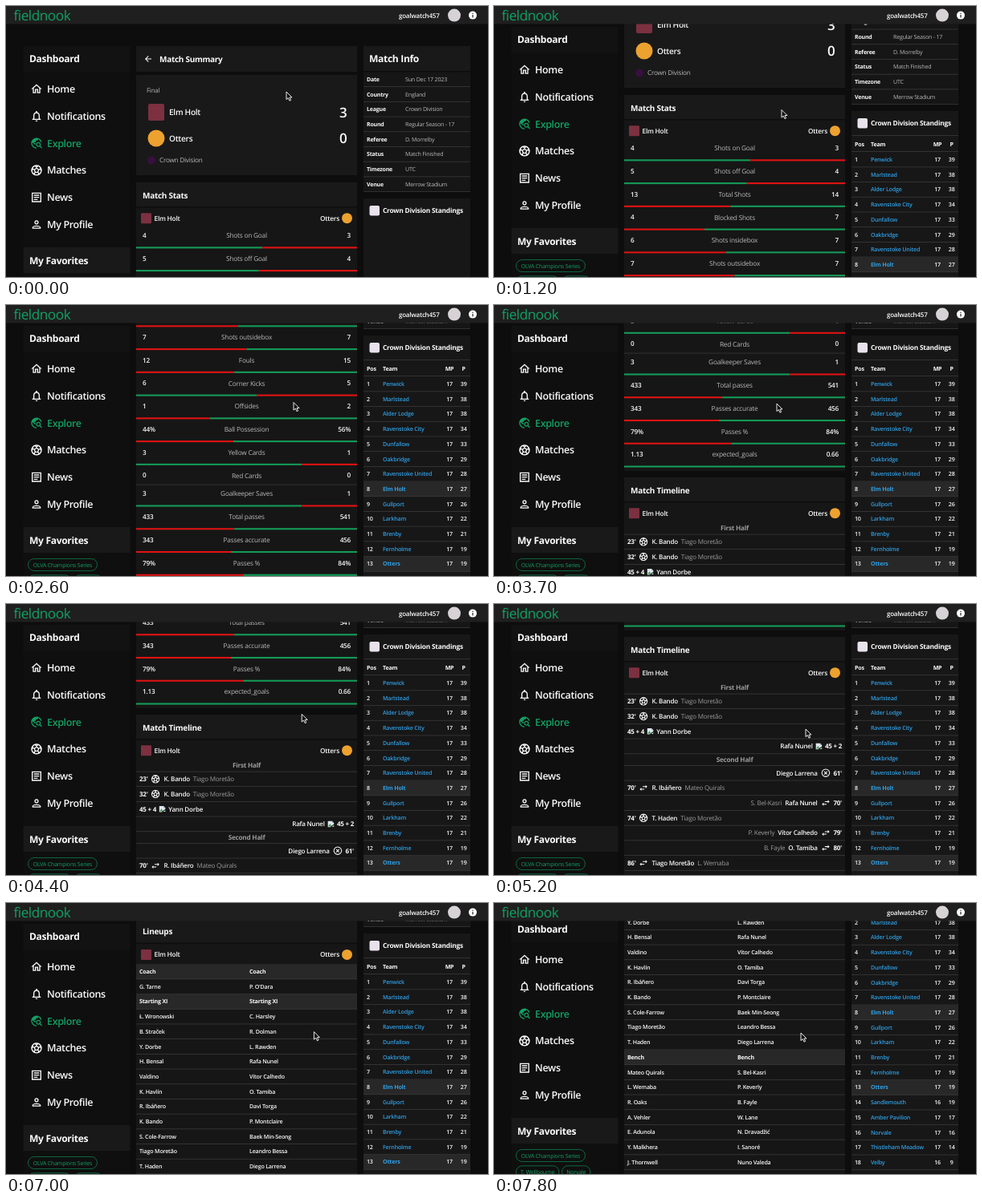
Animation, 600 px wide and 338 px high, one loop 7.9 s. Source, as an HTML page:

```html
<!DOCTYPE html>
<html lang="en">
<head>
<meta charset="utf-8">
<title>Match summary</title>
<style>
  html, body { margin: 0; width: 100%; height: 100%; overflow: hidden; background: #0d0d0d; }
  svg { display: block; }
  text {
    font-family: "Open Sans", "Noto Sans", sans-serif; fill: #fafafa; white-space: pre;
    letter-spacing: -.028em; text-rendering: geometricPrecision;
  }
  .b { font-weight: 700; }
  .m { font-weight: 600; }
  .grey { fill: #b8b8b8; }
  .dim { fill: #9a9a9a; }
  .green { fill: #12a063; }
  .link { fill: #2f9fe4; }
</style>
</head>
<body>
<svg id="stage" width="600" height="338" viewBox="0 0 600 338">
  <g id="main"></g>
  <g id="left"></g>
  <g id="right"></g>
  <g id="bar"></g>
  <path id="cursor" d="M0 0V9.6L2.3 7.6L4 11.2L5.6 10.4L4 7H7Z" fill="#111" stroke="#fff" stroke-width=".9" stroke-linejoin="round"/>
</svg>
<script>
const LOOP = 7900, STEP = 100, PITCH = 18.7;
const $ = id => document.getElementById(id);
const ruler = document.createElement('canvas').getContext('2d');

const HOME = 'Elm Holt', AWAY = 'Otters', LEAGUE = 'Crown Division';
const HOME_COLOR = '#7c3040', AWAY_COLOR = '#eda12f';

// Drawing helpers; text is centred vertically on y.
const text = (x, y, size, str, cls = '', anchor = 'start') =>
  `<text x="${x}" y="${(y + size * .357).toFixed(2)}" font-size="${size}" class="${cls}" text-anchor="${anchor}">${str}</text>`;
const rect = (x, y, w, h, fill, rx = 0) =>
  `<rect x="${x}" y="${y}" width="${w}" height="${h}" fill="${fill}" rx="${rx}"/>`;
const dot = (x, y, r, fill) => `<circle cx="${x}" cy="${y}" r="${r}" fill="${fill}"/>`;
const rule = (x, y, w) => rect(x, y - .35, w, .7, '#3e3e3e');
const icon = (name, x, y, size, color = '#fafafa') =>
  `<g transform="translate(${x - size / 2} ${y - size / 2}) scale(${size / 24})" fill="${color}" color="${color}">${ICONS[name]}</g>`;
const widthOf = (str, weight, size) => {
  ruler.font = `${weight} ${size}px "Open Sans", "Noto Sans", sans-serif`;
  return ruler.measureText(str).width - .028 * size * str.length;
};
const solid = d => `<path d="${d}"/>`;
const line = d => `<path d="${d}" fill="none" stroke="currentColor" stroke-width="2"/>`;

const ICONS = {
  home: solid('M12 5.69l5 4.5V18h-2v-6H9v6H7v-7.81l5-4.5M12 3L2 12h3v8h6v-6h2v6h6v-8h3L12 3z'),
  bell: solid('M12 22c1.1 0 2-.9 2-2h-4c0 1.1.89 2 2 2zm6-6v-5c0-3.07-1.64-5.64-4.5-6.32V4c0-.83-.67-1.5-1.5-1.5s-1.5.67-1.5 1.5v.68C7.63 5.36 6 7.92 6 11v5l-2 2v1h16v-1l-2-2zm-2 1H8v-6c0-2.48 1.51-4.5 4-4.5s4 2.02 4 4.5v6z'),
  globe: solid('M19.3 16.9c.4-.7.7-1.5.7-2.4 0-2.5-2-4.5-4.5-4.5S11 12 11 14.5s2 4.5 4.5 4.5c.9 0 1.7-.3 2.4-.7l3.2 3.2 1.4-1.4-3.2-3.2zm-3.8.1c-1.4 0-2.5-1.1-2.5-2.5s1.1-2.5 2.5-2.5 2.5 1.1 2.5 2.5-1.1 2.5-2.5 2.5zM12 20v2C6.48 22 2 17.52 2 12S6.48 2 12 2c4.84 0 8.87 3.44 9.8 8h-2.07c-.64-2.46-2.4-4.47-4.73-5.41V5c0 1.1-.9 2-2 2h-2v2c0 .55-.45 1-1 1H8v2h2v3H9l-4.79-4.79C4.08 10.79 4 11.38 4 12c0 4.41 3.59 8 8 8z'),
  ball: line('M12 3a9 9 0 1 0 .01 0zM12 8l4 3-1.5 4.6h-5L8 11zM12 8V5.5L9 4M12 5.5L15 4M16 11l2.5-1 1.5-3M18.5 10L21 12M14.5 15.6l1.6 2.4-1 2.5M9.5 15.6L7.9 18l1 2.5M8 11l-2.5-1L4 7M5.5 10L3 12'),
  news: line('M4 4H20V20H4ZM7 8H17M7 12H17M7 16H14'),
  person: line('M12 5a3 3 0 1 0 .01 0zM5 19v-1c0-2 4.5-3.1 7-3.1s7 1.1 7 3.1v1z'),
  swap: solid('M6.99 11L3 15l3.99 4v-3H14v-2H6.99v-3zM21 9l-3.99-4v3H10v2h7.01v3L21 9z'),
  cancel: line('M12 3a9 9 0 1 0 .01 0zM8.5 8.5l7 7M15.5 8.5l-7 7'),
  back: solid('M20 11H7.83l5.59-5.59L12 4l-8 8 8 8 1.41-1.41L7.83 13H20v-2z'),
  broken: '<path d="M2 2H16L22 8V13L13 18L10 22H2Z" fill="#dfe6ee"/><path d="M16 2V8H22Z" fill="#9aa4ae"/><path d="M4 18L9 11L13 16L10 20H4Z" fill="#3fa14a"/><path d="M14 21L22 16V21Z" fill="#dfe6ee"/>'
};

// A panel has a header strip, a dark gap and a body.
const panel = (x, y, w, h, head) =>
  rect(x, y, w, h, '#161616') + rect(x, y, w, head, '#191919') + rect(x, y + head, w, 1.5, '#0d0d0d');

const crests = y =>
  rect(168, y - 6.5, 13, 13, HOME_COLOR, 1) + text(184.5, y, 8.3, HOME, 'm') +
  text(415, y, 8.3, AWAY, 'm', 'end') + dot(424.5, y, 6.5, AWAY_COLOR);

const section = (top, height, title) =>
  panel(162, top, 275, height, 30) + text(170, top + 16, 10, title, 'b') + crests(top + 44.7);

function scoreCard() {
  const team = (y, name, score) => text(203, y, 10.1, name, 'm') + text(419.5, y, 17, score, 'm', 'middle');
  return rect(162, 50, 275, 32, '#191919') + icon('back', 177, 66, 12) + text(191, 66, 10, 'Match Summary', 'b') +
    rect(162, 86, 275, 125, '#191919') + text(175, 105.5, 7.9, 'Final', 'grey') +
    rect(177, 122, 20, 21, HOME_COLOR, 2) + team(132.5, HOME, 3) +
    dot(187, 165, 10.5, AWAY_COLOR) + team(165, AWAY, 0) +
    dot(181, 192.5, 5, '#37103f') + text(191, 192.5, 8.2, LEAGUE, 'grey');
}

const STATS = [
  ['Shots on Goal', 4, 3], ['Shots off Goal', 5, 4], ['Total Shots', 13, 14], ['Blocked Shots', 4, 7],
  ['Shots insidebox', 6, 7], ['Shots outsidebox', 7, 7], ['Fouls', 12, 15], ['Corner Kicks', 6, 5],
  ['Offsides', 1, 2], ['Ball Possession', '44%', '56%'], ['Yellow Cards', 3, 1], ['Red Cards', 0, 0],
  ['Goalkeeper Saves', 3, 1], ['Total passes', 433, 541], ['Passes accurate', 343, 456],
  ['Passes %', '79%', '84%'], ['expected_goals', 1.13, '0.66']
];

function stats() {
  let y = 286.3, out = section(220, 541, 'Match Stats');
  for (const [label, home, away] of STATS) {
    const a = parseInt(home), b = parseInt(away), sum = a + b;
    out += text(170, y, 8.2, home, 'm') + text(299.5, y, 8.3, label, 'grey', 'middle') + text(429, y, 8.2, away, 'm', 'end');
    if (sum) {
      const w = 275 * a / sum, win = a > b;
      out += rect(162, y + 14, w, 2.1, win ? '#149a58' : '#e01212') +
        rect(162 + w, y + 14, 275 - w, 2.1, win ? '#e01212' : '#149a58');
    } else out += rule(162, y + 11.5, 275);
    y += sum ? 28.75 : 22.9;
  }
  return out;
}

// side, time, icon, player, second player
const FIRST_HALF = [
  ['L', "23'", 'ball', 'K. Bando', 'Tiago Moretão'],
  ['L', "32'", 'ball', 'K. Bando', 'Tiago Moretão'],
  ['L', '45 + 4', 'broken', 'Yann Dorbe'],
  ['R', '45 + 2', 'broken', 'Rafa Nunel']
];
const SECOND_HALF = [
  ['R', "61'", 'cancel', 'Diego Larrena'],
  ['L', "70'", 'swap', 'R. Ibáñero', 'Mateo Quirals'],
  ['R', "70'", 'swap', 'Rafa Nunel', 'S. Bel-Kasri'],
  ['L', "74'", 'ball', 'T. Haden', 'Tiago Moretão'],
  ['R', "79'", 'swap', 'Vítor Calhedo', 'P. Keverly'],
  ['R', "80'", 'swap', 'O. Tamiba', 'B. Fayle'],
  ['L', "86'", 'swap', 'Tiago Moretão', 'L. Wemaba'],
  ['L', "86'", 'swap', 'K. Bando', 'R. Oaks'],
  ['L', "87'", 'broken', 'Bohumil Straček'],
  ['L', '90 + 3', 'broken', 'Armin Vehler'],
  ['L', '90 + 1', 'swap', 'B. Straček', 'A. Vehler']
];

function event([side, time, kind, who, other = ''], y) {
  const size = 8, dir = side === 'L' ? 1 : -1, anchor = dir > 0 ? 'start' : 'end';
  const small = kind === 'broken', start = dir > 0 ? 166 : 433;
  const mid = start + dir * (widthOf(time, 700, size) + (small ? 7.5 : 9.5));
  const nameX = mid + dir * (small ? 7.7 : 10.3);
  const otherX = nameX + dir * (widthOf(who, 600, size) + 4);
  return text(start, y, size, time, 'b', anchor) + icon(kind, mid, y, small ? 9 : 12.5) +
    text(nameX, y, size, who, 'm', anchor) + text(otherX, y, size, other, 'dim', anchor) +
    rule(162, y + PITCH / 2, 275);
}

function timeline() {
  const half = (y, label) => text(299.5, y, 8.2, label, 'b dim', 'middle') + rule(162, y + 7.6, 275);
  return section(769, 366, 'Match Timeline') +
    half(832.5, 'First Half') + FIRST_HALF.map((e, i) => event(e, 849.3 + i * PITCH)).join('') +
    half(922, 'Second Half') + SECOND_HALF.map((e, i) => event(e, 938.7 + i * PITCH)).join('');
}

const LINEUPS = `Coach|Coach
G. Tarne|P. O'Dara
Starting XI|Starting XI
Ł. Wronowski|C. Harsley
B. Straček|R. Dolman
Y. Dorbe|L. Rawden
H. Bensal|Rafa Nunel
Valdino|Vítor Calhedo
K. Havlín|O. Tamiba
R. Ibáñero|Davi Torga
K. Bando|P. Montclaire
S. Cole-Farrow|Baek Min-Seong
Tiago Moretão|Leandro Bessa
T. Haden|Diego Larrena
Bench|Bench
Mateo Quirals|S. Bel-Kasri
L. Wemaba|P. Keverly
R. Oaks|B. Fayle
A. Vehler|W. Lane
E. Adunola|N. Dravadžić
Y. Malkhera|I. Sanoré
J. Thornwell|Nuno Valeda`.split('\n').map(row => row.split('|'));

function lineups() {
  return section(1143.7, 500, 'Lineups') + LINEUPS.map(([a, b], i) => {
    const y = 1209.5 + i * PITCH, head = a === b, cls = head ? 'b' : 'm';
    return (head ? rect(162, y - PITCH / 2, 275, PITCH, '#282828') : '') +
      text(166, y, 7.1, a, cls) + text(303, y, 7.1, b, cls) + rule(162, y + PITCH / 2, 275);
  }).join('');
}

function sidebar() {
  const items = [['home', 'Home'], ['bell', 'Notifications'], ['globe', 'Explore'], ['ball', 'Matches'], ['news', 'News'], ['person', 'My Profile']];
  const chip = (x, y, w, label) =>
    `<rect x="${x}" y="${y - 7.5}" width="${w}" height="15" rx="7.5" fill="none" stroke="#0f7c4e" stroke-width=".8"/>` +
    text(x + w / 2, y, 7, label, 'green', 'middle');
  return rect(21.5, 50, 133, 400, '#0f0f0f') + rect(21.5, 50, 133, 32, '#121212') + text(29, 66, 12.1, 'Dashboard', 'b') +
    items.map(([name, label], i) => {
      const y = 103.5 + i * 33.8, on = name === 'globe';
      return icon(name, 38, y, 16, on ? '#12a063' : '#fafafa') + text(51, y, 12.5, label, on ? 'm green' : 'm');
    }).join('') +
    rect(21.5, 301, 133, 32, '#191919') + text(29, 317.3, 12.1, 'My Favorites', 'b') +
    chip(27.5, 348, 86, 'OLVA Champions Series') + chip(27.5, 368.3, 53.5, 'T. Wellbourne') + chip(84.5, 368.3, 35.5, 'Norvale');
}

const INFO = [['Date', 'Sun Dec 17 2023'], ['Country', 'England'], ['League', LEAGUE], ['Round', 'Regular Season - 17'],
  ['Referee', 'D. Morrelby'], ['Status', 'Match Finished'], ['Timezone', 'UTC'], ['Venue', 'Merrow Stadium']];
// team, points, matches played
const TABLE = [['Penwick', 39], ['Marlstead', 38], ['Alder Lodge', 38], ['Ravenstoke City', 34], ['Dunfallow', 33], ['Oakbridge', 29],
  ['Ravenstoke United', 28], [HOME, 27], ['Gullport', 26], ['Larkham', 22], ['Brenby', 21], ['Fernholme', 19], [AWAY, 19],
  ['Sandlemouth', 19, 16], ['Amber Pavilion', 17], ['Norvale', 16], ['Thistleham Meadow', 14], ['Velby', 9, 16]];

function infoColumn() {
  const cells = (y, pos, team, mp, pts, cls, teamCls) =>
    text(449, y, 7.1, pos, cls) + text(469, y, 7.1, team, teamCls) +
    text(552, y, 7.1, mp, cls, 'middle') + text(569.7, y, 7.1, pts, cls, 'middle') + rule(445, y + PITCH / 2, 133);
  const rows = TABLE.map(([team, pts, played = 17], i) => {
    const y = 300.5 + i * PITCH, own = team === HOME || team === AWAY;
    return (own ? rect(445, y - PITCH / 2, 133, PITCH, '#282828') : '') +
      cells(y, i + 1, team, played, pts, 'm', own ? 'b link' : 'm link');
  }).join('');
  return panel(445, 50, 133, 181.5, 31) + text(452, 66, 12.1, 'Match Info', 'b') +
    INFO.map(([key, value], i) => {
      const y = 91.3 + i * PITCH;
      return text(449, y, 7, key, 'b') + text(497, y, 7.1, value, 'grey') + rule(445, y + PITCH / 2, 133);
    }).join('') +
    rect(445, 240, 133, 420, '#171717') + rect(452.5, 249, 12.5, 12.5, '#e8e2ec', 2) +
    text(469, 255.2, 8.4, LEAGUE + ' Standings', 'b') +
    `<g id="table">${rule(445, 270.5, 133)}${cells(281, 'Pos', 'Team', 'MP', 'P', 'b', 'b')}${rows}</g>`;
}

const topBar = () => rect(0, 0, 600, 22.5, '#1f1f1f') + text(9.5, 11.5, 17.2, 'fieldnook', 'green') +
  text(539.5, 11.7, 8, 'goalwatch457', 'm', 'end') + dot(558, 11.6, 8, '#d6d2d6') +
  dot(581, 11.6, 5, '#fff') + rect(580.4, 11, 1.2, 3.4, '#1f1f1f') + rect(580.4, 8.8, 1.2, 1.2, '#1f1f1f');

$('main').innerHTML = scoreCard() + stats() + timeline() + lineups();
$('left').innerHTML = sidebar();
$('right').innerHTML = infoColumn();
$('bar').innerHTML = topBar();

// Monotone cubic through a few timed points.
const TIMES = [0, 1200, 2600, 3700, 5200, 6200, 7800];
const SCROLL = [0, 109, 390, 554, 728, 963, 1279];
const CURSOR_X = [349, 358, 358, 352, 388, 385, 382];
const CURSOR_Y = [107, 129.5, 121.5, 123, 156, 159, 162];

function curve(values) {
  const n = TIMES.length - 1;
  const slope = TIMES.slice(1).map((t, i) => (values[i + 1] - values[i]) / (t - TIMES[i]));
  const tangent = TIMES.map((_, i) => {
    if (i === 0) return slope[0] / 2;
    if (i === n) return slope[n - 1];
    const a = slope[i - 1], b = slope[i];
    return a * b > 0 ? 2 * a * b / (a + b) : 0;
  });
  return t => {
    let i = 0;
    while (i < n - 1 && t > TIMES[i + 1]) i++;
    const h = TIMES[i + 1] - TIMES[i], u = Math.min(1, (t - TIMES[i]) / h), v = 1 - u;
    return values[i] * v * v * (1 + 2 * u) + values[i + 1] * u * u * (3 - 2 * u) +
      h * u * v * (tangent[i] * v - tangent[i + 1] * u);
  };
}
const scrollAt = curve(SCROLL), cursorX = curve(CURSOR_X), cursorY = curve(CURSOR_Y);
const move = (id, x, y) => $(id).setAttribute('transform', `translate(${x} ${y})`);
// Sticky column: scrolls, sticks, then leaves with the end of the page.
const sticky = (s, stop, leave) => -(Math.min(s, stop) + Math.max(0, s - leave));

function draw(now) {
  const t = Math.floor(now % LOOP / STEP) * STEP;
  const s = Math.round(scrollAt(t));
  move('main', 0, -s);
  move('left', 0, sticky(s, 24, 1270));
  move('right', 0, sticky(s, 202, 1186));
  move('cursor', cursorX(t).toFixed(1), cursorY(t).toFixed(1));
  $('table').style.display = t < 300 ? 'none' : '';
}

const begin = performance.now();
function tick() {
  draw(performance.now() - begin);
  requestAnimationFrame(tick);
}
tick();
</script>
</body>
</html>
```
